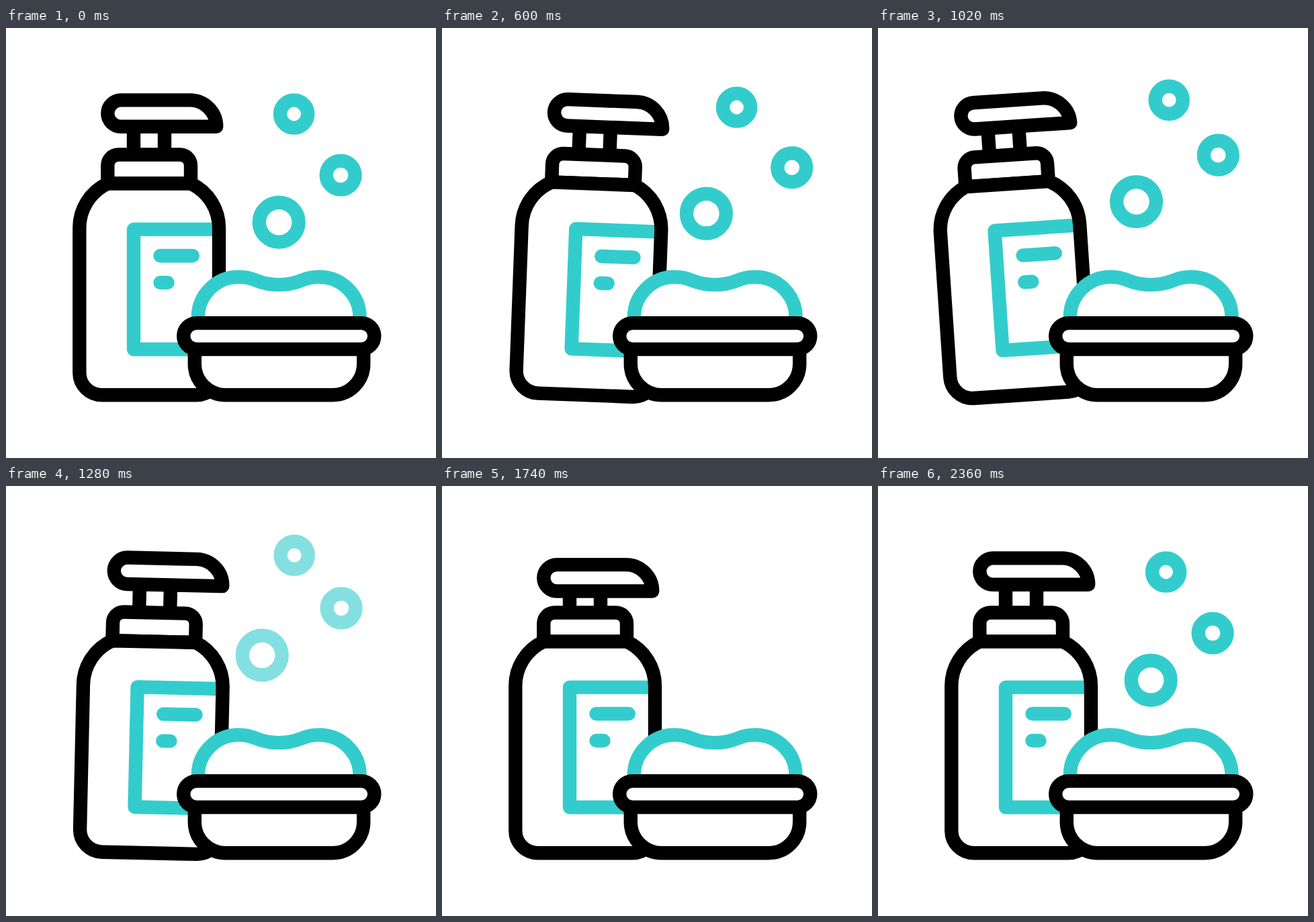
These frames come from a looping animation (640x640 px, 2420 ms). An HTML page:

```html
<!DOCTYPE html>
<html lang="en">
<head>
<meta charset="utf-8">
<title>Soap and dispenser</title>
<style>
html, body { margin: 0; width: 100%; height: 100%; overflow: hidden; background: #fff; }
svg { display: block; width: 100vw; height: 100vh; }
.line { stroke: #000; stroke-width: 20.4; stroke-linecap: round; stroke-linejoin: round; fill: none; }
.teal { stroke: #33cccc; }
.white { fill: #fff; }
.flat { stroke-linecap: butt; }
</style>
</head>
<body>
<svg viewBox="0 0 640 640">
  <defs>
    <path id="body" d="M151.3 231.5A73 73 0 0 0 109.3 298V513A33.3 33.3 0 0 0 142.6 546.3H283.7A33.3 33.3 0 0 0 317 513V298A73 73 0 0 0 275 231.5Z"/>
  </defs>
  <g id="bottle">
    <path class="line flat" d="M190 152V188M236 152V188"/>
    <path id="pump" class="line white" d="M171 107.4H274A39.4 39.4 0 0 1 313.2 146.8H171A19.7 19.7 0 0 1 171 107.4Z"/>
    <path class="line white" d="M151.3 231.5V204.5A16 16 0 0 1 167.3 188.5H259A16 16 0 0 1 275 204.5V231.5Z"/>
    <use href="#body" class="white"/>
    <path class="line teal flat" d="M317 299.6H190V478.2H317"/>
    <path class="line teal" d="M229.5 339H277.8M229.5 379H240.5"/>
    <use href="#body" class="line"/>
  </g>
  <g id="bubbles"></g>
  <path class="line teal white" d="M285.8 439V430.5A60.3 60.3 0 0 1 347 370.5C356 370.5 364.5 372.4 372.2 375.7C393.7 384.2 418.3 384.2 439.9 375.7C447.6 372.4 456.1 370.5 465.1 370.5A60.3 60.3 0 0 1 526.6 430.5V439"/>
  <path class="line white" d="M280.8 478V500A46.2 46.2 0 0 0 327 546.3H486A46.2 46.2 0 0 0 532.2 500V478"/>
  <rect class="line white" x="264.2" y="439.1" width="284.1" height="39" rx="19.5"/>
</svg>
<script>
const LOOP = 2420, STEP = 20, LAST = 118, UNIT = 12.7;
const bottle = document.getElementById('bottle');
const pump = document.getElementById('pump');
const layer = document.getElementById('bubbles');

// home, radius, then start, turn and end offsets in units
const bubbles = [
  { x: 428.6, y: 128, r: 20.6, from: [1, 1], turn: [1, -1], end: [0, -2] },
  { x: 498.1, y: 219, r: 21.4, from: [1, 1], turn: [2, -1], end: [0, -3] },
  { x: 406.2, y: 289.1, r: 29.4, from: [-1, 1], turn: [-1, -1], end: [-2, -3] }
];
for (const b of bubbles) {
  b.el = document.createElementNS('http://www.w3.org/2000/svg', 'circle');
  b.el.setAttribute('class', 'line teal');
  b.el.setAttribute('r', b.r);
  layer.append(b.el);
}

const clamp = v => Math.max(0, Math.min(1, v));
const ease = v => (v = clamp(v), v * v * (3 - 2 * v));
const mix = (a, b, k) => a + (b - a) * k;
const mixPoint = (a, b, k) => [mix(a[0], b[0], k), mix(a[1], b[1], k)];

// eased value from [time, value] keys
function track(keys, n) {
  for (let i = 1; i < keys.length; i++) {
    const [t0, v0] = keys[i - 1], [t1, v1] = keys[i];
    if (n <= t1) return mix(v0, v1, ease((n - t0) / (t1 - t0)));
  }
  return keys[keys.length - 1][1];
}

// a swing that gets shorter and quicker
const sway = [[0, 0], [20, -6], [35, 5], [50, -4], [60, 2], [70, 0]];
const press = [[0, 0], [70, 0], [85, 10.2], [100, 0]];

// constant-speed walk along home -> turn -> end
function drift(b, p) {
  const first = Math.hypot(...b.turn);
  const second = Math.hypot(b.end[0] - b.turn[0], b.end[1] - b.turn[1]);
  const d = p * (first + second);
  return d < first
    ? mixPoint([0, 0], b.turn, d / first)
    : mixPoint(b.turn, b.end, (d - first) / second);
}

function draw(ms) {
  const n = Math.min(LAST, Math.floor((ms % LOOP + 0.01) / STEP));
  bottle.setAttribute('transform', `rotate(${track(sway, n)} 213.2 546.4)`);
  pump.setAttribute('transform', `translate(0 ${track(press, n)})`);
  const leaving = n < 80;
  layer.setAttribute('opacity', leaving ? clamp((70 - n) / 10) : clamp((n - 90) / 28));
  for (const b of bubbles) {
    const [dx, dy] = leaving
      ? drift(b, ease(n / 70))
      : mixPoint(b.from, [0, 0], ease((n - 90) / 20));
    b.el.setAttribute('cx', b.x + dx * UNIT);
    b.el.setAttribute('cy', b.y + dy * UNIT);
  }
}

let start;
function tick(now) {
  start ??= now;
  draw(now - start);
  requestAnimationFrame(tick);
}
draw(0);
requestAnimationFrame(tick);
</script>
</body>
</html>
```
